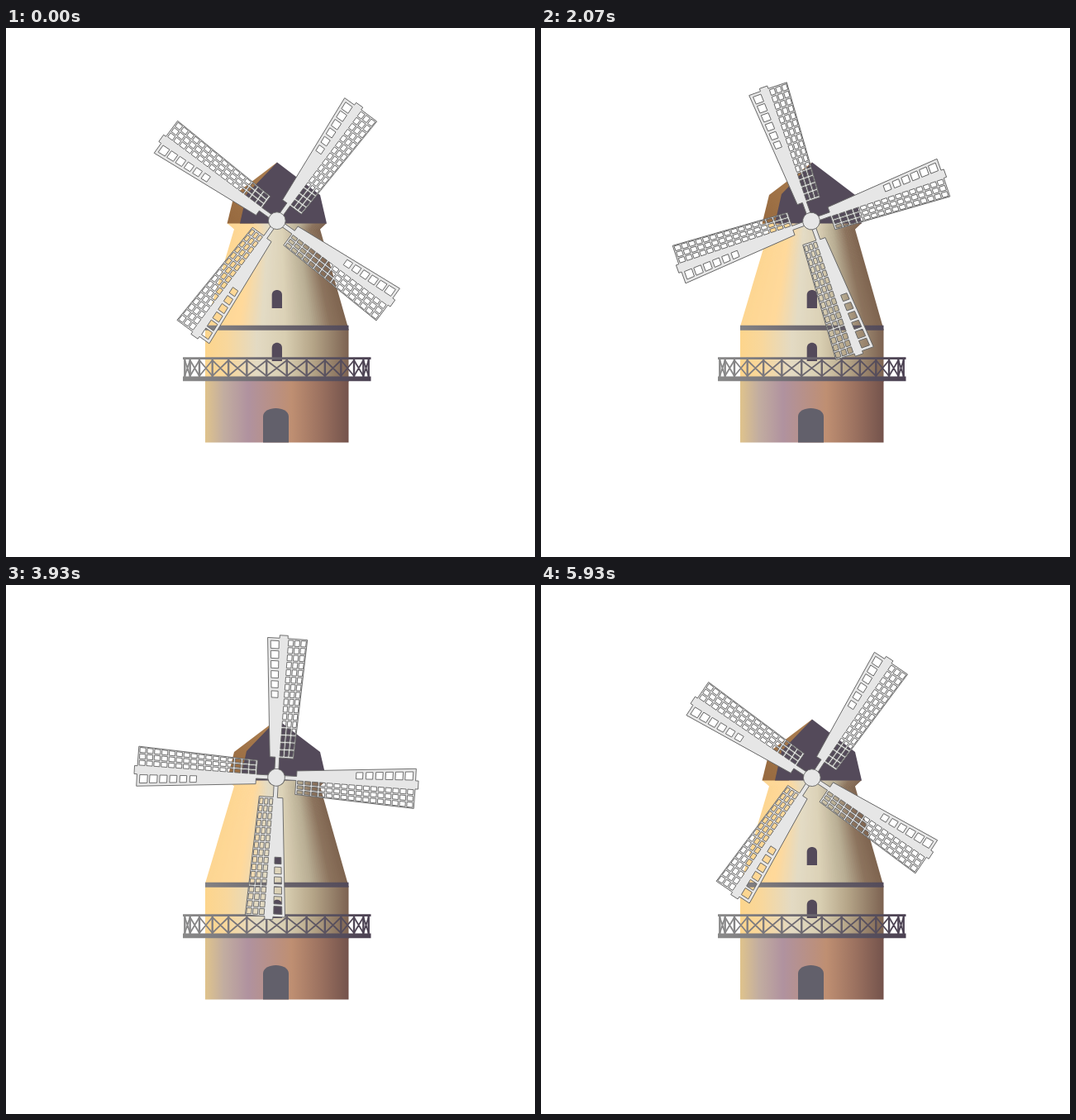
Write an HTML page that moves like this. It is 640 px wide and 640 px high and loops after 6 s.

```html
<!DOCTYPE html>
<html lang="en">
<head>
<meta charset="utf-8">
<title>Windmill</title>
<style>
  html, body { margin: 0; width: 100%; height: 100%; overflow: hidden; background: #fff; }
  svg { display: block; width: 100vw; height: 100vh; }
</style>
</head>
<body>
<svg id="stage" viewBox="0 0 640 640">
  <defs>
    <linearGradient id="wall">
      <stop offset="0" stop-color="#fdd58c"/>
      <stop offset=".15" stop-color="#f8d79c"/>
      <stop offset=".36" stop-color="#e3dac3"/>
      <stop offset=".56" stop-color="#d8ceb1"/>
      <stop offset=".75" stop-color="#b5a588"/>
      <stop offset="1" stop-color="#7c6251"/>
    </linearGradient>
    <linearGradient id="base">
      <stop offset="0" stop-color="#dfc38c"/>
      <stop offset=".13" stop-color="#c2ada0"/>
      <stop offset=".3" stop-color="#b0929f"/>
      <stop offset=".6" stop-color="#bf8f72"/>
      <stop offset=".8" stop-color="#9c7260"/>
      <stop offset="1" stop-color="#74534c"/>
    </linearGradient>
    <linearGradient id="iron" gradientUnits="userSpaceOnUse" x1="214" y1="0" x2="441" y2="0">
      <stop offset="0" stop-color="#8a8a8a"/>
      <stop offset="1" stop-color="#4b4152"/>
    </linearGradient>
    <linearGradient id="side" x1="0" y1="1" x2="1" y2="0">
      <stop offset="0" stop-color="#96693f"/>
      <stop offset="1" stop-color="#ad8052"/>
    </linearGradient>
  </defs>
  <g id="cone"></g>
  <path fill="url(#wall)" d="M241 364H414.5V428H241Z"/>
  <path fill="url(#base)" d="M241 426H414.5V501.5H241Z"/>
  <path fill="url(#iron)" d="M241 359.8H414.5V365.8H241Z"/>
  <path fill="#62606b" d="M311 501.5V470C311 456.500 342 456.500 342 470V501.500Z"/>
  <g fill="#544a5a">
    <path d="M321.700 339V323C321.700 315 334 315 334 323V339Z"/>
    <path d="M321.700 403V387C321.700 378.500 334 378.500 334 387V403Z"/>
    <path fill="url(#side)" d="M267.500 236.500L276 202L328 162.500L300 236.500Z"/>
    <path d="M283 236.500L291 201L328 162.500L380 202L388 236.500Z"/>
  </g>
  <g id="balcony" fill="none" stroke="url(#iron)"></g>
  <g id="sails" fill="#e6e6e6" stroke="#666" stroke-width=".9"></g>
</svg>
<script>
const LOOP = 6000, STEPS = 84, TICK = 40, DEG_PER_TICK = 2.4;
const PIVOT = { x: 327.3, y: 233.2 };
const $ = id => document.getElementById(id);
const lerp = (a, b, t) => a + (b - a) * t;
const poly = points => 'M' + points.map(p => p.map(n => n.toFixed(2)).join(' ')).join('L') + 'Z';

// Tapered wall: narrow slices shade the cone from left to right.
function cone() {
  const stops = [
    [0, 253, 214, 146], [.24, 255, 217, 155], [.4, 227, 219, 197], [.56, 220, 210, 183],
    [.74, 184, 173, 147], [.88, 140, 115, 93], [1, 126, 100, 79]
  ];
  const shade = f => {
    const i = Math.max(1, stops.findIndex(s => s[0] >= f));
    const [a, b] = [stops[i - 1], stops[i]];
    const t = (f - a[0]) / (b[0] - a[0]);
    return `rgb(${[1, 2, 3].map(k => Math.round(lerp(a[k], b[k], t)))})`;
  };
  const slices = 70;
  let out = '';
  for (let i = 0; i < slices; i++) {
    const f = i / slices, g = Math.min(1, (i + 1.4) / slices);
    const edge = (l, r, y) => [[lerp(l, r, f), y], [lerp(l, r, g), y]];
    const outline = [
      ...edge(267.5, 388, 236), ...edge(276, 380, 243.5).reverse().slice(0, 1),
      ...edge(241, 413.5, 361).reverse(), edge(276, 380, 243.5)[0]
    ];
    out += `<path fill="${shade((i + .5) / slices)}" d="${poly(outline)}"/>`;
  }
  return out;
}

// Round balcony: evenly spaced posts seen from the front.
function balcony() {
  const post = k => 327.5 + 112.5 * Math.sin((k - .5) * 12.5 * Math.PI / 180);
  let posts = '', braces = '';
  for (let k = -6; k <= 7; k++) {
    const x = post(k), next = post(k + 1);
    posts += `M${x} 400V424`;
    if (k < 7) braces += `M${x} 402L${next} 421M${x} 421L${next} 402`;
  }
  return `<path stroke-width="1.8" d="${braces}"/><path stroke-width="2.4" d="${posts}"/>` +
    '<path fill="url(#iron)" stroke="none" d="M214 398.300H441.500V401H214ZM214 421.500H441.500V427.300H214Z"/>';
}

// One sail pointing up from the hub, with its openings cut out.
function sail() {
  const cell = (left, right, far, near) => {
    const [lf, rf] = [left(far), right(far)], [ln, rn] = [left(near), right(near)];
    return poly([[lf, -far], [rf, -far], [rn, -near], [ln, -near]]);
  };
  let d = poly([
    [-2.6, -8], [-2.6, -24.5], [-9.2, -24.5], [-19.6, -168.5], [-5, -168.5], [-5, -172],
    [5, -172], [5, -168.5], [28.6, -168], [19.4, -23.7], [2.4, -24], [2.4, -8]
  ]);
  const rows = 16, pitch = 142.5 / rows;
  const at = (v, inner, outer) => lerp(inner, outer, (v - 24) / 144);
  const column = c => v => lerp(at(v, 1.8, 5), at(v, 19.2, 28.4), c / 3);
  for (let i = 0; i < rows; i++) {
    const far = 166.5 - i * pitch;
    for (let c = 0; c < 3; c++) {
      d += cell(v => column(c)(v) + .9, v => column(c + 1)(v) - .9, far, far - pitch + 1.9);
    }
  }
  for (let i = 0; i < 6; i++) {
    const mid = 160.4 - i * 12, half = lerp(4.7, 4, i / 5);
    d += cell(v => lerp(-11.3, -15.4, (v - 100) / 60), v => lerp(-3.4, -5.5, (v - 100) / 60),
      mid + half, mid - half);
  }
  return d;
}

$('cone').innerHTML = cone();
$('balcony').innerHTML = balcony();
const shape = sail();
$('sails').innerHTML = [0, 1, 2, 3].map(k =>
  `<path fill-rule="evenodd" transform="rotate(${35.5 + 90 * k})" d="${shape}"/>`
).join('') + '<circle r="10.4"/>';

// The turn advances in held steps, each snapped to a 40 ms tick.
function draw(time) {
  const step = Math.floor((time % LOOP + 5) * STEPS / LOOP) % STEPS;
  const angle = Math.ceil(step * LOOP / STEPS / TICK - 1e-6) * DEG_PER_TICK;
  $('sails').setAttribute('transform',
    `translate(${PIVOT.x} ${PIVOT.y}) rotate(${angle}) translate(.5 0)`);
}

const start = performance.now();
function tick() {
  draw(performance.now() - start);
  requestAnimationFrame(tick);
}
draw(0);
requestAnimationFrame(tick);
</script>
</body>
</html>
```
